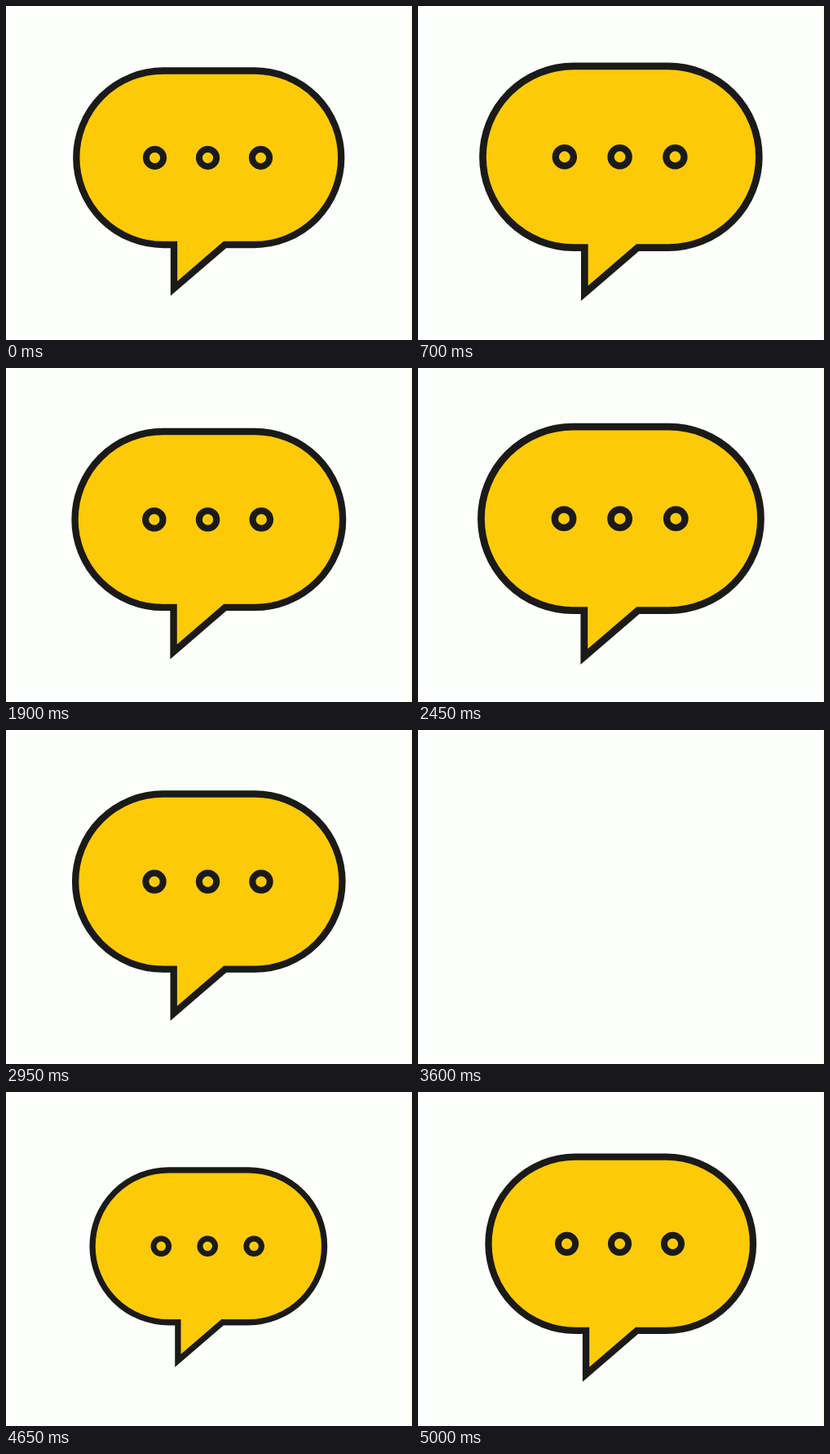
Write an HTML page that moves like this. It is 498x410 px and loops after 5050 ms.

```html
<!DOCTYPE html>
<html lang="en">
<head>
<meta charset="utf-8">
<title>Typing bubble</title>
<style>
  html, body { margin: 0; width: 100%; height: 100%; overflow: hidden; background: #fdfffc; }
  svg { display: block; }
</style>
</head>
<body>
<svg width="498" height="410" viewBox="0 0 498 410">
  <rect x="496.5" width="1.5" height="410" fill="#fbfbca"/>
  <g id="bubble" fill="#fdca08" stroke="#1a1a18" stroke-width="8.3" stroke-miterlimit="10">
    <path d="M193 79.5H304.5A106.75 106.75 0 0 1 304.5 293H268.5L206 346.8V293H193A106.75 106.75 0 0 1 193 79.5Z"/>
    <g stroke-width="8">
      <circle cx="182.5" cy="186.3" r="10.6"/>
      <circle cx="247.5" cy="186.3" r="10.6"/>
      <circle cx="312.5" cy="186.3" r="10.6"/>
    </g>
  </g>
</svg>
<script>
const LOOP = 5050, PULSE = 1022, PULSES_END = 3 * PULSE;
const EXIT_END = 3600, ENTER = 4100, ENTER_TIME = 940;
const CENTER = [245.2, 210.6];
const bubble = document.getElementById('bubble');

// cubic-bezier(.25, .1, .25, 1), solved by bisection
function ease(x) {
  let low = 0, high = 1, s = 0.5;
  for (let i = 0; i < 24; i++) {
    s = (low + high) / 2;
    if (0.75 * s * (1 - s) + s ** 3 < x) low = s; else high = s;
  }
  return 0.3 * s * (1 - s) ** 2 + 3 * s * s * (1 - s) + s ** 3;
}

function scaleAt(t) {
  if (t < PULSES_END) return 1 + 0.031 * (1 - Math.cos(2 * Math.PI * t / PULSE));
  if (t < EXIT_END) return 1 - ((t - PULSES_END) / (EXIT_END - PULSES_END)) ** 6;
  if (t <= ENTER) return 0;
  return ease(Math.min(1, (t - ENTER) / ENTER_TIME));
}

function draw() {
  const scale = scaleAt(performance.now() % LOOP);
  const [x, y] = CENTER;
  bubble.setAttribute('visibility', scale ? 'visible' : 'hidden');
  bubble.setAttribute('transform', `translate(${x} ${y}) scale(${scale}) translate(${-x} ${-y})`);
  requestAnimationFrame(draw);
}
draw();
</script>
</body>
</html>
```
